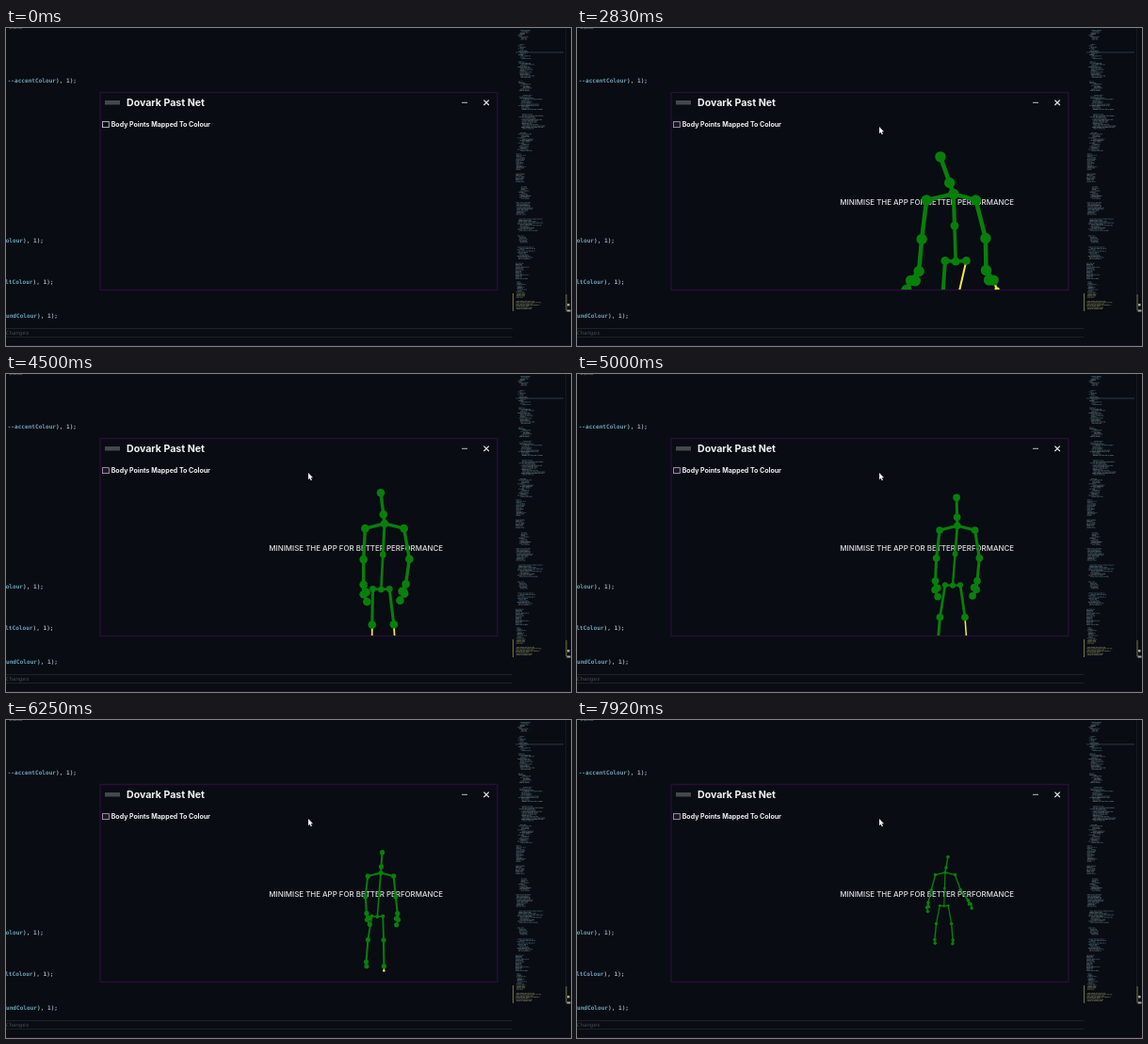
These frames come from a looping animation (600 px wide and 338 px high, 8000 ms). An HTML page with a canvas:

```html
<!DOCTYPE html>
<html lang="en">
<head>
<meta charset="utf-8">
<title>Body tracking window</title>
<style>
  html, body { margin: 0; width: 100%; height: 100%; overflow: hidden; background: #090c13; }
  canvas { display: block; width: 600px; height: 338px; }
</style>
</head>
<body>
<canvas id="stage"></canvas>
<script>
const W = 600, H = 338, LOOP = 8000, STEP = 1000 / 12;
const BG = '#090c13', GREEN = '#087f0b', YELLOW = '#f2ea35';
const SANS = 'Inter, "Open Sans", sans-serif';
const MONO = '"DejaVu Sans Mono", "Liberation Mono", monospace';
const BODY_START = 1410;

const canvas = document.getElementById('stage');
const ratio = window.devicePixelRatio || 1;
canvas.width = W * ratio;
canvas.height = H * ratio;
const ctx = canvas.getContext('2d');
ctx.scale(ratio, ratio);

const lerp = (a, b, u) => a + (b - a) * u;
const clamp = u => Math.min(1, Math.max(0, u));
const smooth = u => u * u * (3 - 2 * u);

function rect(x, y, w, h, color) {
  ctx.fillStyle = color;
  ctx.fillRect(x, y, w, h);
}

function text(str, x, y, font, color, align = 'left') {
  ctx.font = font;
  ctx.fillStyle = color;
  ctx.textAlign = align;
  ctx.fillText(str, x, y);
}

function line(x1, y1, x2, y2, width, color) {
  ctx.lineWidth = width;
  ctx.strokeStyle = color;
  ctx.beginPath();
  ctx.moveTo(x1, y1);
  ctx.lineTo(x2, y2);
  ctx.stroke();
}

function seeded(seed) {
  return () => {
    seed = (seed * 1664525 + 1013904223) >>> 0;
    return seed / 4294967296;
  };
}

// --- editor behind the window ---

function codeLine(name, right, y) {
  const font = 'bold 6.1px ' + MONO;
  text('), 1);', right, y, font, '#a3aeb7', 'right');
  text(name, right - ctx.measureText('), 1);').width, y, font, '#6fa3b8', 'right');
}

function minimap() {
  const rnd = seeded(71);
  const tones = ['#3a4a54', '#46525a', '#2f4551', '#4b5256'];
  let y = 2;
  while (y < 300) {
    const end = Math.min(301, y + 7 + rnd() * 14);
    const indent = rnd() * 6, wide = 11 + 24 * rnd() * rnd();
    for (; y < end; y += 1.35) {
      const x = 541 + indent * (0.5 + rnd());
      const len = wide * (0.35 + 0.6 * rnd());
      for (let dx = 0; dx < len;) {
        const run = 1.5 + rnd() * 4;
        const tone = y > 281 ? '#4c513c' : tones[Math.floor(rnd() * tones.length)];
        rect(x + dx, y, Math.min(run, len - dx), 0.95, tone);
        dx += run + 0.5;
      }
    }
    y += 2 + rnd() * 2.5;
  }
  rect(541, 25.5, 51, 0.8, '#36474f');
  rect(538, 282, 1, 19, '#77763a');
  rect(594, 0, 0.7, 302, '#1a2027');
  rect(594.5, 283, 1, 17, '#77763a');
  rect(596, 293, 2.5, 2.5, '#a3a79e');
  rect(595.5, 299.5, 4, 2, '#a3a79e');
}

function editor() {
  rect(0, 0, W, H, BG);
  text('some', 3, 1, '6.1px ' + MONO, '#6d7f88');
  codeLine('--accentColour', 75, 58.3);
  codeLine('colour', 40, 227.8);
  codeLine('ltColour', 50.5, 272.3);
  codeLine('oundColour', 55, 307.8);
  rect(0, 319, 538, 0.8, '#23272d');
  rect(0, 328, 538, 0.8, '#23272d');
  text('Changes', 0, 326.3, 'italic 5.8px ' + MONO, '#454a50');
  rect(0, 337, W, 1, '#1d1029');
  minimap();
}

// --- application window ---

function appWindow(t) {
  rect(100, 68, 422, 211, BG);
  ctx.lineWidth = 1.4;
  ctx.strokeStyle = '#2a0d38';
  ctx.strokeRect(100, 68.5, 421.8, 210);

  rect(105, 77, 16, 4.5, '#45484c');
  text('Dovark Past Net', 128, 82.8, '700 10.6px ' + SANS, '#f4f4f5');
  line(484, 79.3, 490, 79.3, 0.9, '#d4d4d8');
  line(507.4, 76.6, 512.8, 82, 1.1, '#ececf0');
  line(512.8, 76.6, 507.4, 82, 1.1, '#ececf0');

  const focused = t >= 1080;
  if (focused) rect(103, 100, 6, 6, '#1d1525');
  ctx.lineWidth = 0.9;
  ctx.strokeStyle = focused ? '#a996b2' : '#bfc0c4';
  ctx.strokeRect(102.5, 99.6, 6.8, 6);
  text('Body Points Mapped To Colour', 111.7, 105.3, '700 7.03px ' + SANS, '#f0f0f2');

  if (t >= BODY_START) {
    text('MINIMISE THE APP FOR BETTER PERFORMANCE', 371.7, 187.6,
         '500 7.9px ' + SANS, '#dfe0e2', 'center');
  }
}

// --- tracked body ---

// Chest position and bone angles in degrees from straight down;
// arms turn outward, legs to the right, each pair is left then right.
const poses = [
  { t: 1830, chest: [405, 193], head: -20, spine: 3, arms: [8, 15], fores: [5, -3], legs: [-14, -12] },
  { t: 3580, chest: [396, 164], head: -19, spine: 1, arms: [6, 14], fores: [9, 0], legs: [0, -10] },
  { t: 4500, chest: [402, 159], head: -7, spine: -3, arms: [3, 10], fores: [0, -8], legs: [-1, 7] },
  { t: 5580, chest: [406, 164], head: 5, spine: -6, arms: [11, 8], fores: [3, 0], legs: [-16, 7] },
  { t: 6920, chest: [390, 161], head: 3, spine: -3, arms: [3, 3], fores: [-3, 4], legs: [-11, 5] },
  { t: 7920, chest: [391, 162], head: 10, spine: -2, arms: [15, 20], fores: [14, 36], legs: [-11, 10] }
];

const chains = ['head neck chest mid base'];
for (const s of ['l.', 'r.']) {
  for (const chain of ['shoulder elbow wrist hand tip', 'wrist thumb', 'hip knee ankle foot']) {
    chains.push(chain.replace(/\w+/g, name => s + name));
  }
  chains.push(`chest ${s}shoulder`, `base ${s}hip`);
}

function mix(a, b, u) {
  if (Array.isArray(a)) return a.map((v, i) => lerp(v, b[i], u));
  return lerp(a, b, u);
}

function poseAt(t) {
  let i = 0;
  while (i < poses.length - 2 && t >= poses[i + 1].t) i++;
  const a = poses[i], b = poses[i + 1];
  const u = clamp((t - a.t) / (b.t - a.t));
  const p = {};
  for (const key in a) p[key] = mix(a[key], b[key], u);
  // Walking swing that rests at each key pose.
  p.swing = Math.sin(Math.PI * u) * Math.sin((t - a.t) / 170) * 6;
  return p;
}

function bone([x, y], length, degrees) {
  const a = degrees * Math.PI / 180;
  return [x + length * Math.sin(a), y + length * Math.cos(a)];
}

function skeleton(t) {
  const p = poseAt(t);
  // The walker backs away, so half the shoulder width sets the scale.
  const unit = lerp(28.5, 10.5, clamp((t - 1830) / 5170) ** 1.25);
  const stoop = 1 - smooth(clamp((t - 1830) / 1750));
  const torso = unit * lerp(3.4, 1.72, stoop);
  const j = { chest: p.chest };
  j.head = bone(j.chest, -1.6 * unit, -p.head);
  j.neck = mix(j.head, j.chest, 0.7);
  j.base = bone(j.chest, torso, p.spine);
  j.mid = mix(j.chest, j.base, 0.47);

  ['l.', 'r.'].forEach((s, i) => {
    const out = i ? 1 : -1;
    const [x, y] = j.chest;
    const fore = p.fores[i] - out * p.swing;
    const hand = fore + 90 * stoop;
    j[s + 'shoulder'] = [x + out * unit - 6.5 * stoop, y + unit * 0.25];
    j[s + 'elbow'] = bone(j[s + 'shoulder'], 1.6 * unit, out * p.arms[i]);
    j[s + 'wrist'] = bone(j[s + 'elbow'], 1.3 * unit, out * fore);
    j[s + 'hand'] = bone(j[s + 'wrist'], 0.5 * unit, out * hand);
    j[s + 'tip'] = bone(j[s + 'hand'], 0.42 * unit, out * (hand - 25 * (1 - stoop)));
    j[s + 'thumb'] = bone(j[s + 'wrist'], 0.42 * unit, out * (hand - 20));

    const leg = p.legs[i] + out * p.swing;
    const shank = 2.1 * unit * (1 - 0.02 * Math.abs(leg));
    j[s + 'hip'] = [j.base[0] + out * 0.43 * unit, j.base[1] - 0.03 * unit];
    j[s + 'knee'] = bone(j[s + 'hip'], 1.85 * unit, leg);
    j[s + 'ankle'] = bone(j[s + 'knee'], shank, leg * 0.5);
    j[s + 'foot'] = bone(j[s + 'ankle'], 0.35 * unit, -leg * 0.5);
  });
  return { joints: j, size: 0.25 * unit - 0.85 };
}

// Joints past the slanted edge of the camera's view are only guessed.
function guessed(name, [x, y]) {
  const margin = name.endsWith('foot') ? 30 : 0;
  return y + margin > 300 - (x - 380) / 2;
}

function body(t) {
  const { joints, size } = skeleton(t);
  const radius = name => size * (/mid|base|hip/.test(name) ? 0.78 : 1);
  ctx.save();
  ctx.beginPath();
  ctx.rect(101, 69, 420, 209);
  ctx.clip();
  for (const chain of chains) {
    chain.split(' ').reduce((from, to) => {
      const guess = guessed(to, joints[to]);
      const width = (radius(from) + radius(to)) * (guess ? 0.2 : 0.4);
      line(...joints[from], ...joints[to], width, guess ? YELLOW : GREEN);
      return to;
    });
  }
  for (const name in joints) {
    const guess = guessed(name, joints[name]);
    ctx.fillStyle = guess ? YELLOW : GREEN;
    ctx.beginPath();
    ctx.arc(...joints[name], radius(name) * (guess ? 0.5 : 1), 0, 2 * Math.PI);
    ctx.fill();
  }
  ctx.restore();
}

// --- mouse ---

const glide = (t, start, end) => smooth(clamp((t - start) / (end - start)));

function pointer(t) {
  if (t < 920) return;
  let at = mix([150, 92], [106, 101], glide(t, 920, 1080));
  at = mix(at, [313.5, 120], glide(t, 1420, 1750));
  at = mix(at, [321, 105], glide(t, 1920, 2250));
  ctx.save();
  ctx.translate(...at);
  ctx.fillStyle = '#f3f3f3';
  ctx.fill(new Path2D('M0 0V7.2L1.6 5.7L2.7 8.3L3.9 7.8L2.8 5.3H5Z'));
  ctx.restore();
}

function draw(now) {
  const t = Math.floor(((now % LOOP) + 4) / STEP) % 96 * STEP;
  editor();
  appWindow(t);
  if (t >= BODY_START) body(t);
  pointer(t);
  requestAnimationFrame(draw);
}

draw(0);
</script>
</body>
</html>
```
